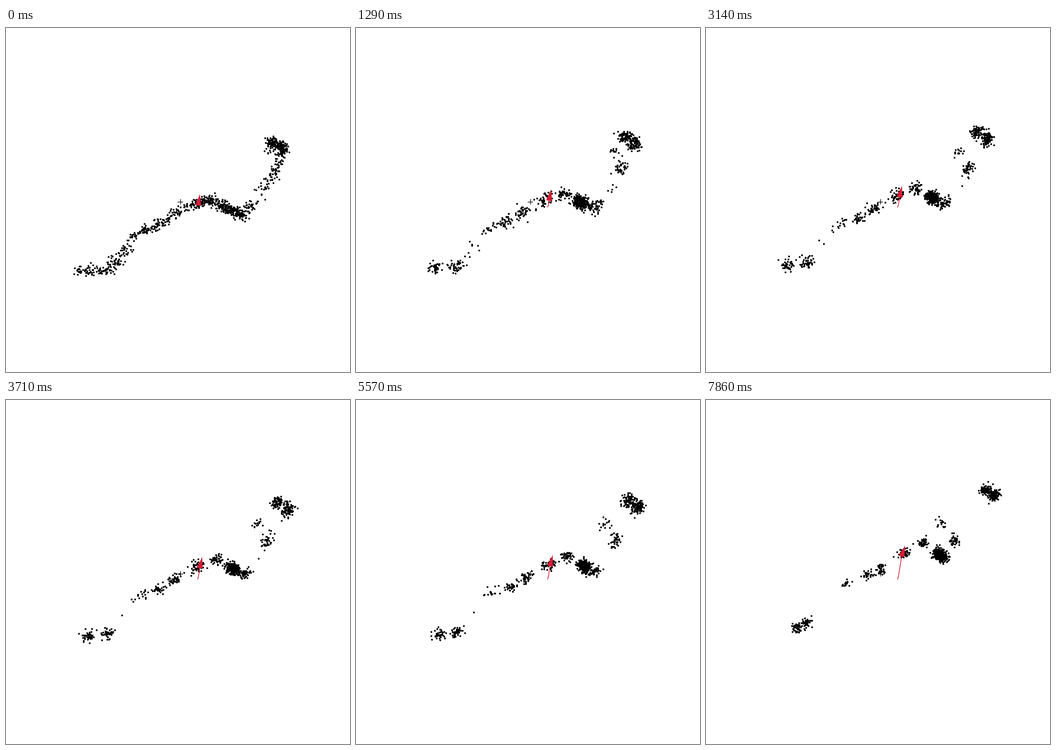
Write a matplotlib script that moves like this. It is 582 by 582 pixels and loops after 8 s.

```python
import numpy as np
import matplotlib.pyplot as plt
from matplotlib.animation import FuncAnimation

SIZE, DPI = 582, 100
PX = 72 / DPI
LOOP_MS, TICK_MS, RATE = 8000, 20, 7
RED = "#d81b34"
SPREAD = 4.6

# Hubs along the particle path: start x, y, end x, y, start and end count.
HUBS = np.array([
    (120, 411, 153, 385, 40, 42),
    (172, 411, 169, 377, 60, 42),
    (197, 380, 200, 350, 50, 0),
    (222, 342, 236, 310, 35, 15),
    (247, 339, 274, 296, 60, 30),
    (277, 319, 294, 287, 45, 45),
    (317, 298, 335, 258, 55, 55),
    (347, 291, 367, 240, 100, 45),
    (377, 305, 394, 260, 140, 290),
    (401, 318, 401, 268, 90, 50),
    (436, 270, 422, 252, 30, 0),
    (457, 238, 419, 239, 50, 42),
    (470, 203, 488, 159, 100, 100),
    (450, 189, 472, 151, 100, 80),
    (447, 210, 397, 209, 10, 15),
])
START, END, COUNTS = HUBS[:, :2], HUBS[:, 2:4], HUBS[:, 4:]

# The filter updates in short bursts of steps.
BURSTS = [(2, 4), (7, 9), (13, 14), (16, 17), (22, 24),
          (26, 30), (39, 40), (44, 47), (54, 55)]
UPDATES = [s for a, b in BURSTS for s in range(a, b + 1)]
TRAVEL = np.interp([0] + UPDATES, [0, 9, 17, 26, 39, 47, 55],
                   [0, 0.23, 0.28, 0.49, 0.65, 0.91, 1])


def robot_at(q):
    """Tip, middle of the back edge and half of that edge."""
    tip = np.array([328 + 9 * q, 281 - 35 * q])
    turn = np.radians(8 + 10 * q)
    ahead = np.array([np.sin(turn), -np.cos(turn)])
    side = np.array([np.cos(turn), np.sin(turn)])
    return tip, tip - 19.5 * ahead, 4.9 * side


def cloud_at(q, along, noise):
    """Particles gather at the drifting hubs while weak hubs die out."""
    hubs = START + (END - START) * q
    first, last = COUNTS.T
    counts = np.rint(last + (first - last) * np.exp(-8 * q)).astype(int)
    alive = np.arange(along.shape[1]) < counts[:, None]
    index = np.arange(len(hubs))
    gather = 1 - 0.88 * np.sqrt(q)
    v = np.abs(index[:, None] + gather * along)[alive]
    path = np.column_stack([np.interp(v, index, c) for c in hubs.T])
    return path + SPREAD * noise[alive]


def build_clouds(keep=0.8):
    rng = np.random.default_rng(11)
    shape = len(HUBS), int(COUNTS.max())
    along = rng.uniform(-0.5, 0.5, shape)
    noise = rng.normal(size=shape + (2,))
    clouds = []
    for q in TRAVEL:
        clouds.append(cloud_at(q, along, noise))
        noise = keep * noise + np.sqrt(1 - keep ** 2) * rng.normal(size=noise.shape)
    return clouds


CLOUDS = build_clouds()

fig = plt.figure(figsize=(SIZE / DPI, SIZE / DPI), dpi=DPI, facecolor="white")
ax = fig.add_axes([0, 0, 1, 1])
ax.set(xlim=(0, SIZE), ylim=(SIZE, 0))
ax.axis("off")

dots, = ax.plot([], [], "o", color="black", ms=3.1 * PX, mew=0)
trail, = ax.plot([], [], color=RED, lw=1.2 * PX, zorder=3)
arrow = ax.fill([0, 0, 0], [0, 0, 0], color=RED, lw=0, zorder=4)[0]
for xs, ys in (([290, 299], [293.5] * 2), ([294.5] * 2, [289, 298])):
    ax.plot(xs, ys, color="black", lw=PX, solid_capstyle="butt", zorder=5)


def draw(i):
    step = (i * TICK_MS + 10) * RATE // 1000
    k = int(np.searchsorted(UPDATES, step, side="right"))
    q = TRAVEL[k]
    dots.set_data(*CLOUDS[k].T)
    tip, back, side = robot_at(q)
    arrow.set_xy([back - side, tip, back + side])
    path = [(324, 303)] + [robot_at(s)[1] for s in np.linspace(0, q, 12)]
    trail.set_data(*np.transpose(path))
    trail.set_visible(q > 0)
    return dots, trail, arrow


anim = FuncAnimation(fig, draw, frames=LOOP_MS // TICK_MS, interval=TICK_MS,
                     repeat=True, repeat_delay=0, blit=False)
plt.show()
```
